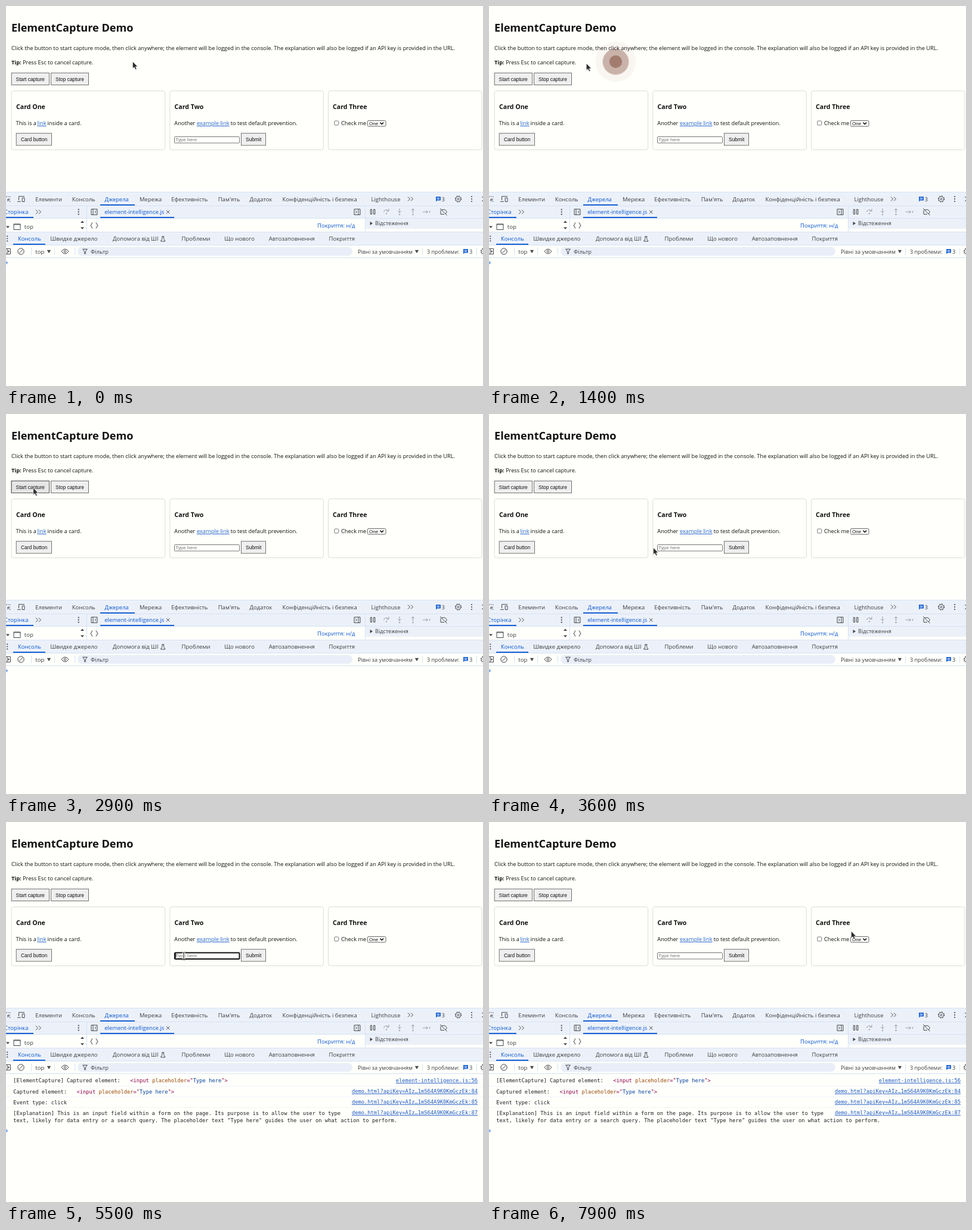
These frames come from a looping animation (800x638 px, 8 s). An HTML page:

```html
<!DOCTYPE html>
<html lang="en">
<head>
<meta charset="utf-8">
<title>ElementCapture Demo</title>
<style>
  html, body { margin: 0; width: 100%; height: 100%; overflow: hidden; background: #fffffb; }
  svg { display: block; width: 800px; height: 638px; }
  text { font: 9.28px "Open Sans", "Noto Sans", sans-serif; fill: #111; white-space: pre; }
  .h1 { font-size: 18.1px; font-weight: 700; }
  .h3 { font-size: 10.6px; font-weight: 700; }
  .bold { font-weight: 700; }
  .link { fill: #2463cc; text-decoration: underline; }
  .ui text { font: 8.45px "Liberation Sans", Arial, sans-serif; }
  .ui .small { font-size: 8.1px; }
  .ui .hint { fill: #757575; }
  .button { fill: #efefef; stroke: #727272; }
  .card { fill: none; stroke: #dcdcd8; }
  .field { fill: #fffffd; stroke: #767676; }
  .tools text { font-size: 9.5px; fill: #3a3d42; }
  .tools .file { font-size: 9.6px; }
  .tools .note { font-size: 9.2px; }
  .tools .on { fill: #0b57d0; }
  .bar { fill: #ecf1f9; }
  .rule { stroke: #d5e2f6; fill: none; }
  .log .rule { stroke: #f0f4fa; }
  .mark { fill: #1a62d2; }
  .icon { fill: none; stroke: #44474c; stroke-width: 1; }
  .solid { fill: #44474c; }
  .dim { stroke: #989ca3; }
  .log text { font: 8.77px "DejaVu Sans Mono", monospace; fill: #202124; }
  .log .ref { fill: #1d59c4; text-decoration: underline; text-anchor: end; }
  .log .tag { fill: #8e004b; }
  .log .attr { fill: #994500; }
  .log .value { fill: #0842a0; }
  .prompt { fill: none; stroke: #4285f4; stroke-width: 1.1; }
  .timed { visibility: hidden; }
  .ripple { fill: rgb(115, 55, 38); opacity: 0; }
  #cursor { animation: move 8s linear infinite; }
  @keyframes move {
    0%, 13.75% { transform: translate(212px, 93px); animation-timing-function: cubic-bezier(.33, 0, .67, .33); }
    17.5% { transform: translate(163px, 96px); animation-timing-function: cubic-bezier(.33, .6, .6, 1); }
    23.75%, 35% { transform: translate(39px, 121px); animation-timing-function: cubic-bezier(.45, 0, .6, .95); }
    45% { transform: translate(275px, 224px); animation-timing-function: ease-out; }
    47.5%, 77.5% { transform: translate(298px, 225px); animation-timing-function: ease-in-out; }
    86.25%, 90% { transform: translate(44px, 122px); animation-timing-function: ease-in-out; }
    96.25% { transform: translate(672px, 222px); animation-timing-function: ease-in-out; }
    98.75%, 100% { transform: translate(607px, 183px); }
  }
</style>
</head>
<body>
<svg viewBox="0 0 800 638">
  <defs>
    <g id="dots"><circle cy="-4" r="1.1"/><circle r="1.1"/><circle cy="4" r="1.1"/></g>
    <path id="more" d="M-4.5 -3.5 L-1 0 L-4.5 3.5 M0.5 -3.5 L4 0 L0.5 3.5"/>
    <path id="down" d="M-3.2 -2.5 H3.2 L0 2.8 Z"/>
    <g id="gear"><circle r="4.3"/><circle r="1.5"/><circle r="5.2" stroke-dasharray="2 2.08"/></g>
    <g id="issue"><path class="mark" d="M0 0 H8 V6.5 H2 L0 8.5 Z"/><path d="M1.7 2.3 H6.3 M1.7 4.3 H6.3" stroke="#fff" stroke-width=".9"/></g>
    <path id="chevron" class="prompt" d="M-1 -2.8 L2.5 0 L-1 2.8"/>
    <path id="beamShape" d="M-3 -6.5 Q0 -6.5 0 -4.5 Q0 -6.5 3 -6.5 M0 -4.5 V4.5 M-3 6.5 Q0 6.5 0 4.5 Q0 6.5 3 6.5"/>
  </defs>

  <g id="page">
    <text class="h1" x="9" y="43">ElementCapture Demo</text>
    <text x="9" y="74.3">Click the button to start capture mode, then click anywhere; the element will be logged in the console. The explanation will also be logged if an API key is provided in the URL.</text>
    <text class="bold" x="9" y="98.3">Tip:</text>
    <text x="28" y="98.3">Press Esc to cancel capture.</text>
    <rect class="card" x="9.2" y="142.5" width="257.5" height="99" rx="3.5"/>
    <rect class="card" x="274.8" y="142.5" width="257.5" height="99" rx="3.5"/>
    <rect class="card" x="540.5" y="142.5" width="257.5" height="99" rx="3.5"/>
    <text class="h3" x="17" y="173.2">Card One</text>
    <text class="h3" x="282.5" y="173.2">Card Two</text>
    <text class="h3" x="548" y="173.2">Card Three</text>
    <text x="16.6" y="200">This is a</text>
    <text class="link" x="52.3" y="200">link</text>
    <text x="69.5" y="200">inside a card.</text>
    <text x="282.3" y="200">Another</text>
    <text class="link" x="320" y="200">example link</text>
    <text x="376.7" y="200">to test default prevention.</text>
    <text x="562" y="200">Check me</text>
  </g>

  <g class="ui">
    <rect class="button" x="9.2" y="112.4" width="63.3" height="20.1"/>
    <rect id="hover" class="button timed" x="9.2" y="112.4" width="63.3" height="20.1" style="fill:#e5e5e5;stroke:#555"/>
    <rect id="press" class="button timed" x="9.2" y="112.4" width="63.3" height="20.1" style="fill:#f5f5f5"/>
    <text x="16.5" y="125.5">Start capture</text>
    <rect class="button" x="75.5" y="112.4" width="63" height="20.1"/>
    <text x="83" y="125.5">Stop capture</text>
    <rect class="button" x="17.2" y="213.7" width="59.3" height="20.3"/>
    <text x="25" y="227.2">Card button</text>
    <rect class="button" x="394.5" y="213.7" width="41" height="20.3"/>
    <text x="402" y="227.2">Submit</text>
    <rect class="field" x="282.5" y="219.5" width="109" height="10.5" rx="1"/>
    <rect id="fieldHover" class="field timed" x="282.5" y="219.5" width="109" height="10.5" rx="1" style="stroke:#444"/>
    <text class="small hint" x="284.3" y="227.2">Type here</text>
    <rect id="focus" class="timed" x="283" y="219.5" width="108.5" height="10.4" rx="1.5" fill="none" stroke="#101010" stroke-width="2"/>
    <path id="caret" class="timed" d="M284.7 220.5 V228.5" stroke="#111"/>
    <rect class="field" x="550.8" y="193" width="7" height="7" rx="1.3"/>
    <rect class="field" x="606.5" y="192.5" width="30.5" height="9.5" rx="1.5" style="stroke:#666"/>
    <text class="small" x="609" y="200.2">One</text>
    <path d="M627.5 195.6 L630.3 198.4 L633.1 195.6" fill="none" stroke="#111" stroke-width="1.5"/>
  </g>

  <g class="tools">
    <path class="bar" d="M0 312.5 H800 V356 H0 Z M602 356 H800 V374 H602 Z M0 379.5 H800 V401 H0 Z"/>
    <path class="rule" d="M0 312.5 H800 M0 335.5 H800 M0 356.5 H800 M0 379.5 H800 M0 401.5 H800 M0 422.5 H800 M135.5 335 V379 M602.5 335 V379"/>
    <path class="rule" d="M42.5 406 V418 M81.5 406 V418 M115.5 406 V418 M698.5 406 V418 M789.5 406 V418"/>
    <path class="mark" d="M158 333 h58 v2 h-58 Z M0 354 h46 v2 h-46 Z M158 354 h124 v2 h-124 Z M12 399 h54 v2 h-54 Z"/>

    <path class="icon" d="M0 320 H8" stroke-dasharray="1.5 1.5"/>
    <path class="icon" d="M-1 329 V320 M7.5 329 L3 324.5 M3 328 V324.2 H7"/>
    <path class="icon" d="M21.5 326 V319.7 H31 M19 328.3 H25 M27.2 322.2 H31 V328.5 H27.2 Z"/>
    <text x="49.2" y="327.5">Елементи</text>
    <text x="110.8" y="327.5">Консоль</text>
    <text class="on" x="165.4" y="327.5">Джерела</text>
    <text x="224" y="327.5">Мережа</text>
    <text x="277.3" y="327.5">Ефективність</text>
    <text x="355.7" y="327.5">Пам'ять</text>
    <text x="408.5" y="327.5">Додаток</text>
    <text x="463.5" y="327.5">Конфіденційність і безпека</text>
    <text x="612.5" y="327.5">Lighthouse</text>
    <use href="#more" class="icon" x="678.5" y="324"/>
    <use href="#issue" x="721" y="320"/>
    <text class="note" x="730.7" y="327.5">3</text>
    <use href="#gear" class="icon" x="758.5" y="324"/>
    <use href="#dots" class="solid" x="781" y="324"/>
    <path class="icon" d="M798 320 L806 328 M798 328 L806 320"/>

    <text class="on" x="-3" y="349.3">Сторінка</text>
    <use href="#more" class="icon" x="54.5" y="345.7"/>
    <use href="#dots" class="solid" x="121.7" y="345.7"/>
    <path class="icon" d="M143 341 H153 V350.5 H143 Z M146 341 V350.5 M151.5 343.5 L149 345.7 L151.5 348"/>
    <text class="file on" x="165.2" y="349.3">element-intelligence.js</text>
    <path class="icon" d="M269 343 L274.5 348.5 M269 348.5 L274.5 343"/>
    <path class="icon" d="M584 341 H594 V350.5 H584 Z M591 341 V350.5 M586 343.5 L588.5 345.7 L586 348"/>
    <path class="icon" d="M611.3 341.5 h2.3 v8 h-2.3 Z M616.6 341.5 h2.3 v8 h-2.3 Z"/>
    <path class="icon dim" d="M633.5 346 A4.5 4.5 0 0 1 641.5 343.8 M642 340.5 V344.5 H638 M660 340 V347 M657.3 344.5 L660 347.2 L662.7 344.5 M682.5 348 V340.5 M679.8 343 L682.5 340.3 L685.2 343 M699 345.7 H707 M704.7 343.2 L707.2 345.7 L704.7 348.2"/>
    <path d="M638 348.5 h.1 M660 350.2 h.1 M682.5 350.2 h.1 M710.5 345.7 h.1" stroke="#989ca3" stroke-width="2.2" stroke-linecap="round"/>
    <path class="icon" d="M730 342 H736.5 L739.5 345.7 L737 349 M735 349.7 H729 V343 M728 340 L739.5 351.5"/>

    <path class="solid" d="M0 369.5 H6 L3 373 Z"/>
    <path class="icon" d="M13 366 H24 V375.5 H13 Z M13 367 H24"/>
    <text class="file" x="30.8" y="374.2">top</text>
    <path class="solid" d="M125 364 L128 360.5 L131 364 Z M125 371.5 L128 375 L131 371.5 Z"/>
    <path class="icon" d="M145.5 364 Q143.5 364 143.5 366 Q143.5 368.3 141.7 368.5 Q143.5 368.7 143.5 371 Q143.5 373 145.5 373 M150.5 364 Q152.5 364 152.5 366 Q152.5 368.3 154.3 368.5 Q152.5 368.7 152.5 371 Q152.5 373 150.5 373"/>
    <text class="on" x="522" y="371.8">Покриття: н/д</text>
    <path class="solid" d="M610.5 362 L615 365 L610.5 368 Z"/>
    <text class="note" x="619" y="368.3">Відстеження</text>

    <use href="#dots" class="solid" x="2.3" y="390.5"/>
    <text class="on" x="20" y="394.3">Консоль</text>
    <text x="74.3" y="394.3">Швидке джерело</text>
    <text x="179" y="394.3">Допомога від ШІ</text>
    <path class="icon" d="M261 387 H265.5 M262 387 V390.5 L259.5 395 H267 L264.5 390.5 V387"/>
    <text x="294.5" y="394.3">Проблеми</text>
    <text x="366.3" y="394.3">Що нового</text>
    <text x="440.7" y="394.3">Автозаповнення</text>
    <text x="541.5" y="394.3">Покриття</text>

    <path class="icon" d="M-1 407.5 H7.5 V416.5 H-1 M2 407.5 V416.5"/>
    <path class="solid" d="M3.5 409.7 L6.3 412 L3.5 414.3 Z"/>
    <circle class="icon" cx="25" cy="412" r="5.2"/>
    <path class="icon" d="M21.5 415.5 L28.5 408.5"/>
    <text class="file" x="49.3" y="415.7">top</text>
    <use href="#down" class="solid" x="72" y="412.2"/>
    <path class="icon" d="M93 412 Q99 404 105 412 Q99 420 93 412 Z"/>
    <circle class="icon" cx="99" cy="412" r="1.8"/>
    <rect x="120" y="404.5" width="461" height="15" rx="7.5" fill="#e9eff8"/>
    <path class="icon" d="M128.7 408.2 H136.3 L133.3 412.2 V416 H131.7 V412.2 Z"/>
    <text class="note" x="142" y="415.7">Фільтр</text>
    <text class="note" x="590" y="415.7">Рівні за умовчанням</text>
    <use href="#down" class="solid" x="689" y="412.2"/>
    <text style="font-size:9px" x="706" y="415.7">3 проблеми:</text>
    <use href="#issue" x="767" y="408"/>
    <text class="note" x="777" y="415.7">3</text>
    <use href="#gear" class="icon" x="801.5" y="412"/>
  </g>

  <g class="log">
    <g id="first" class="timed">
      <path class="rule" d="M0 443.5 H800"/>
      <text x="12.3" y="437.2">[ElementCapture] Captured element:</text>
      <text x="208.2" y="437.2"><tspan class="tag">&lt;input</tspan> <tspan class="attr">placeholder</tspan><tspan class="tag">="</tspan><tspan class="value">Type here</tspan><tspan class="tag">"&gt;</tspan></text>
      <text class="ref" x="791" y="437">element-intelligence.js:56</text>
    </g>
    <g id="rest" class="timed">
      <path class="rule" d="M0 461.5 H800 M0 479.5 H800"/>
      <text x="12.3" y="455.7">Captured element:</text>
      <text x="118.5" y="455.7"><tspan class="tag">&lt;input</tspan> <tspan class="attr">placeholder</tspan><tspan class="tag">="</tspan><tspan class="value">Type here</tspan><tspan class="tag">"&gt;</tspan></text>
      <text class="ref" x="791" y="455">demo.html?apiKey=AIz…1mS64A9K0KmGczEk:84</text>
      <text x="12.3" y="473.7">Event type: click</text>
      <text class="ref" x="791" y="473">demo.html?apiKey=AIz…1mS64A9K0KmGczEk:85</text>
      <text x="12.3" y="492">[Explanation] This is an input field within a form on the page. Its purpose is to allow the user to type</text>
      <text x="12.3" y="504">text, likely for data entry or a search query. The placeholder text "Type here" guides the user on what action to perform.</text>
      <text class="ref" x="791" y="491">demo.html?apiKey=AIz…1mS64A9K0KmGczEk:87</text>
    </g>
    <use id="prompt1" class="timed" href="#chevron" y="431"/>
    <use id="prompt2" class="timed" href="#chevron" y="449"/>
    <use id="prompt3" class="timed" href="#chevron" y="518.5"/>
  </g>

  <g id="ripples" transform="translate(212.5 93.5)"></g>

  <g id="cursor">
    <path id="arrow" class="timed" d="M0.3 0 V12.2 L3 9.7 L5.1 14 L7.3 13 L5.3 8.9 H9 Z" fill="#2b2b2b" stroke="#fff" stroke-width=".8"/>
    <g id="beam" class="timed" fill="none">
      <use href="#beamShape" stroke="#fff" stroke-width="2.6"/>
      <use href="#beamShape" stroke="#333" stroke-width="1.1"/>
    </g>
  </g>
</svg>
<script>
  const LOOP = 8000, TICK = 100;

  // Each span is [from, to) in ms.
  function show(id, ...spans) {
    const element = document.getElementById(id);
    for (const [from, to] of spans)
      element.animate({ visibility: ['visible', 'visible'] }, { delay: from, duration: to - from });
  }

  function ripple(delay, duration, startScale, startOpacity, endScale) {
    const circle = document.createElementNS('http://www.w3.org/2000/svg', 'circle');
    circle.setAttribute('class', 'ripple');
    circle.setAttribute('r', 23);
    document.getElementById('ripples').append(circle);
    const timing = { delay: 590 + delay, duration };
    circle.animate({ transform: [`scale(${startScale})`, `scale(${endScale})`] }, timing);
    circle.animate([
      { opacity: Math.sqrt(startOpacity), easing: 'cubic-bezier(.333, 0, .667, .333)' },
      { opacity: 0 }
    ], timing);
  }

  ripple(0, 830, 0.25, 1, 1.5);
  ripple(50, 1000, 0, 0.7, 1.25);
  ripple(350, 1000, 0, 0.3, 1);

  show('arrow', [0, 3700], [6400, LOOP]);
  show('beam', [3700, 6400]);
  show('hover', [1800, 3100], [6800, 7400]);
  show('press', [2300, 2500], [7200, 7300]);
  show('fieldHover', [3700, 4100]);
  show('focus', [4100, 7200]);
  show('caret', [4100, 4700], [5300, 5900], [6500, 7100]);
  show('first', [4200, LOOP]);
  show('rest', [5500, LOOP]);
  show('prompt1', [0, 4200]);
  show('prompt2', [4200, 5500]);
  show('prompt3', [5500, LOOP]);

  const animations = document.getAnimations();
  animations.forEach(animation => animation.pause());
  const start = performance.now();

  function draw() {
    const time = (performance.now() - start) % LOOP;
    const tick = Math.floor(time / TICK) * TICK + 0.5;
    animations.forEach(animation => { animation.currentTime = tick; });
    requestAnimationFrame(draw);
  }
  draw();
</script>
</body>
</html>
```
